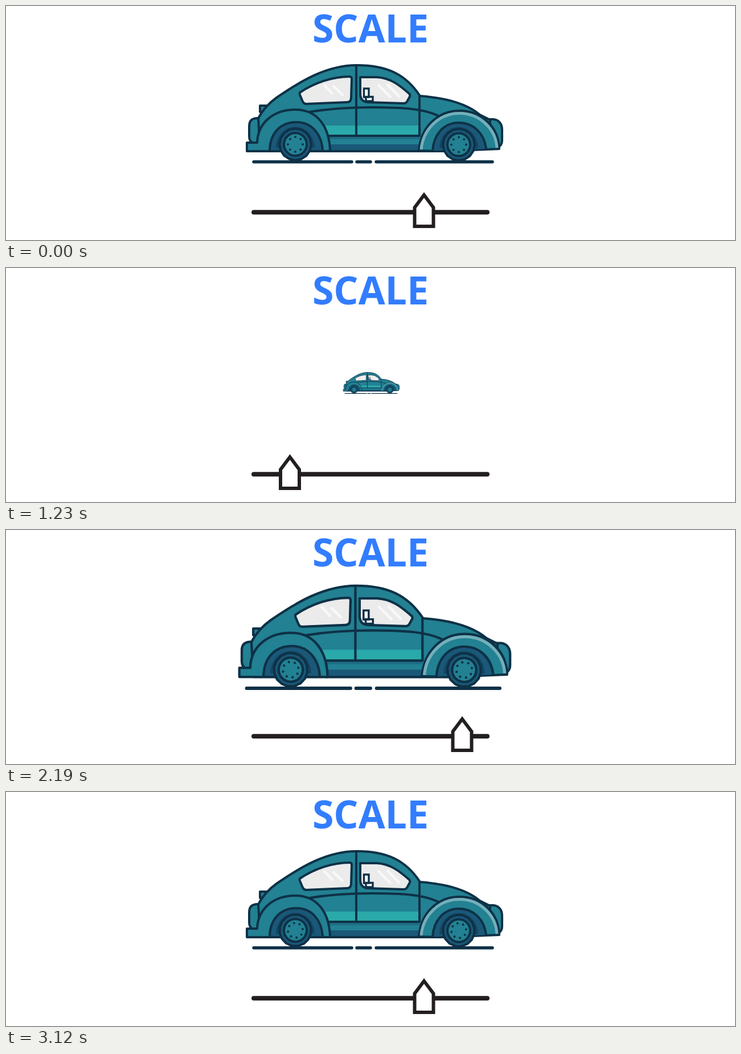
An HTML page for the animation above (3.15 s loop, 1280 by 411 pixels).

```html
<!DOCTYPE html>
<html lang="en">
<head>
<meta charset="utf-8">
<title>Scale</title>
<style>
  html, body { margin: 0; width: 100%; height: 100%; overflow: hidden; background: #fff; }
  svg { display: block; width: 100%; height: 100%; }
  .title {
    font: 700 68px "Open Sans", "Noto Sans", Roboto, sans-serif;
    font-stretch: condensed;
    fill: #327dff;
    text-anchor: middle;
  }
  .line { stroke: #0e3147; stroke-width: 4; stroke-linejoin: round; stroke-linecap: round; }
  .body { fill: #228192; }
  .deep { fill: #1a5878; }
  .bare { fill: none; }
  .glass { fill: #ebebeb; }
  .shine { fill: none; stroke: #f8f8f8; stroke-width: 4.5; }
</style>
</head>
<body>
<svg viewBox="0 0 1280 411" xmlns="http://www.w3.org/2000/svg">
  <text class="title" x="640" y="63.5">SCALE</text>

  <g id="car">
    <path class="line bare" style="stroke-width:5.5" d="M435 273.8H607M616 273.8H640M650 273.8H854"/>

    <!-- tail, lamp and nose -->
    <rect class="line body" x="446" y="175" width="15" height="11"/>
    <path class="line body" d="M465 197H440Q427 198 427 211V229Q427 238 434 241H465Z"/>
    <path class="line body" d="M838 199H856C866 200 871 208 871 217V236Q871 243 866 247H838Z"/>

    <!-- shell -->
    <path class="line body" d="M443 197C451 182 461 171 475 161C517 132 563 104 616 104
      C669 104 702 120 727 158C768 161 807 170 832 191L850 200V250L768 255H446Z"/>
    <path fill="#2aa9aa" d="M555 210H726V227H560Z"/>
    <path fill="#1d6d84" d="M560 229H726V234H560Z"/>
    <path class="deep" d="M560 243H726V254H560Z"/>
    <path class="line bare" d="M533 186C570 180 600 178 642 178C694 178 735 180 761 194
      M562 228H726M615 105V227M726 158V228M566 255H768"/>

    <!-- windows -->
    <g class="glass">
      <path class="line" d="M516 152C541 135 573 124 603 124Q607 124 607 128L606 161
        Q606 169 598 169L527 172Q523 172 521 168L516 156Q515 153 516 152Z"/>
      <path class="line" d="M622 125H651C675 126 692 140 708 154Q710 156 709 159L704 168
        Q702 171 698 171L635 169Q622 168 622 154Z"/>
    </g>
    <path class="shine" d="M558 138L574 155M574 140L592 157"/>
    <path class="shine" d="M653 138L676 161M669 137L691 160"/>
    <path class="line" fill="#fff" style="stroke-width:3.4;stroke-linejoin:miter"
      d="M628.5 145H637V160H628.5ZM632 159.5H644V167H632Z"/>

    <!-- rear fender -->
    <path class="line body" d="M423 240H441C442 205 470 182 508 182C546 182 568 211 569 255H423Z"/>
    <path class="line deep" d="M463 253C464 223 482 204 510 204C537 204 554 225 556 253"/>
    <!-- front fender -->
    <path class="line body" d="M725 254C728 214 757 184 796 184C836 184 865 213 866 251L768 255Z"/>
    <path fill="none" stroke="#75afba" stroke-width="5"
      d="M729 252C732 217 760 188.5 796 188.5C832 188.5 860 216 862 249"/>
    <path class="line deep" d="M749 254C751 225 769 205 795 205C821 205 840 224 843 251"/>

    <g id="wheels"></g>
  </g>

  <path d="M435 362.3H845" stroke="#231f20" stroke-width="8" stroke-linecap="round"/>
  <path id="knob" d="M0 332L16.5 354V387H-16.5V354Z" fill="#fff" stroke="#231f20" stroke-width="6"/>
</svg>

<script>
const LOOP = 3150;
const FULL = 450, TINY = 58, LARGE = 480;
const car = document.getElementById('car');
const knob = document.getElementById('knob');
const wheels = document.getElementById('wheels');

const ring = (n, r) => Array.from({ length: n }, (_, i) => {
  const a = i / n * 2 * Math.PI;
  return [r * Math.sin(a), -r * Math.cos(a)].map(v => v.toFixed(2));
});

function wheel(x, y) {
  const dots = ring(8, 13).map(([cx, cy]) => `<circle cx="${cx}" cy="${cy}" r="2" fill="#0e3147"/>`).join('');
  return `<g transform="translate(${x} ${y})">
    <path d="M-34 6A34 37 0 0 1 34 6Z" fill="#134560"/>
    <g class="spin">
      <polygon class="line deep" points="${ring(16, 27.8).join(' ')}"/>
      <circle class="line body" r="20"/>${dots}
    </g></g>`;
}

wheels.innerHTML = wheel(508, 243) + wheel(795, 243.5);
const spinners = wheels.querySelectorAll('.spin');

function ease(t, start, end) {
  const s = Math.min(1, Math.max(0, (t - start) / (end - start)));
  return s * s * (3 - 2 * s);
}

// Shrink, grow past the resting value, then settle.
const track = (t, rest, low, high, growStart, growEnd) =>
  rest + (low - rest) * ease(t, 0, 750)
       + (high - low) * ease(t, growStart, growEnd)
       + (rest - high) * ease(t, 2050, 2850);

function draw(t) {
  const scale = track(t, FULL, TINY, LARGE, 1080, 1870) / FULL;
  const x = track(t, 734, 445.5, 807, 1050, 1800);
  car.setAttribute('transform', `translate(640 205.5) scale(${scale}) translate(-640 -205.5)`);
  knob.setAttribute('transform', `translate(${x} 0)`);
  const turn = t / LOOP * 1080;
  spinners.forEach(s => s.setAttribute('transform', `rotate(${turn})`));
}

const begin = performance.now();
function frame(now) {
  draw(Math.max(0, now - begin) % LOOP);
  requestAnimationFrame(frame);
}
draw(0);
requestAnimationFrame(frame);
</script>
</body>
</html>
```
